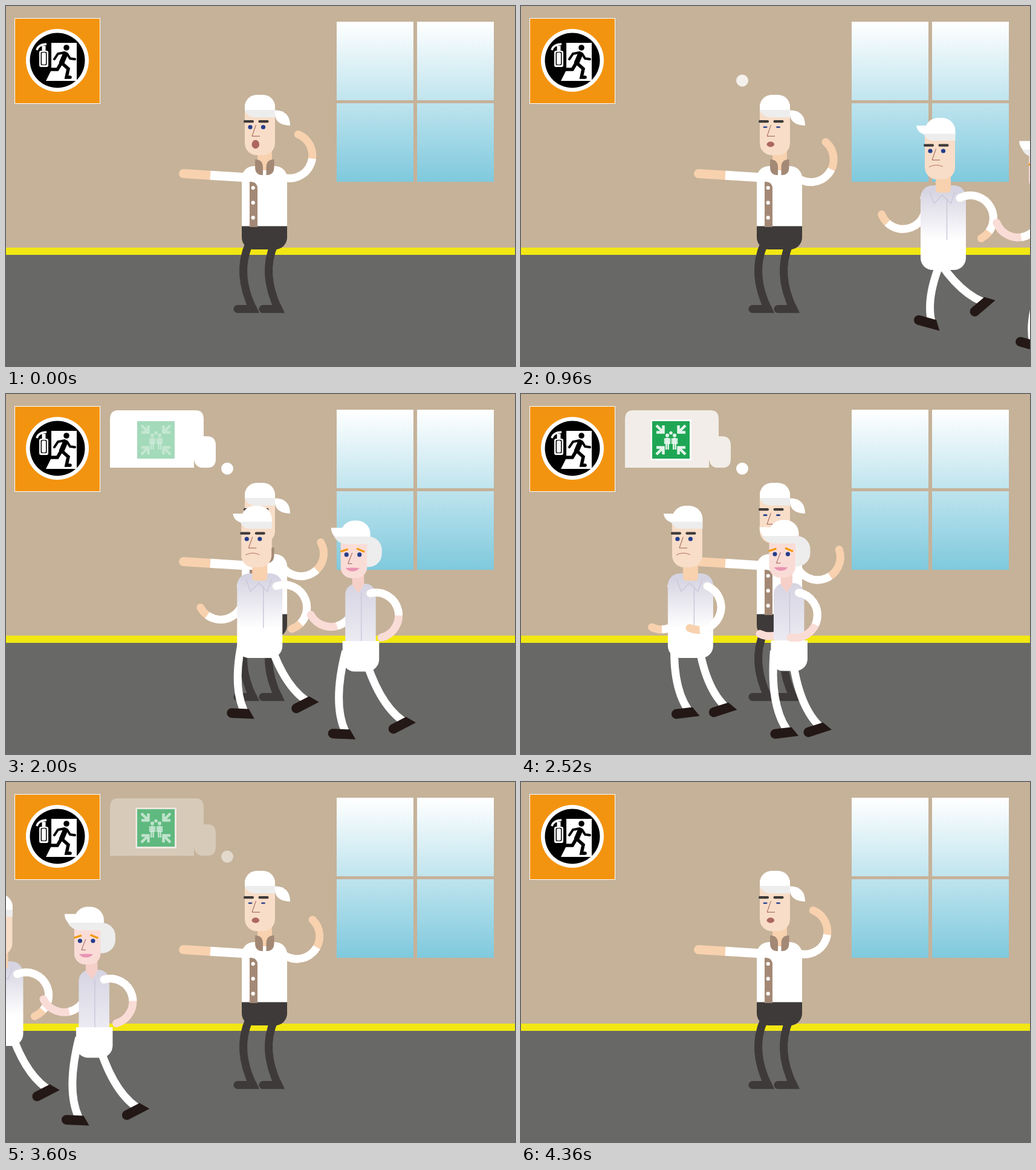
An HTML page with a canvas that plays this animation: 842x596 px, repeating every 4400 ms.

```html
<!DOCTYPE html>
<html>
<head>
<meta charset="utf-8">
<title>Evacuation</title>
<style>
html, body { margin: 0; width: 842px; height: 596px; overflow: hidden }
canvas { display: block }
</style>
</head>
<body>
<canvas id="stage" width="842" height="596"></canvas>
<script>
const c = document.getElementById('stage').getContext('2d');
const LOOP = 4400, STEP = 40, RAD = Math.PI / 180;
const WHITE = '#fff', DARK = '#3e3a39', SKIN = '#f8d1ae', FACE = '#f8ddc8', PINK = '#fadcd7',
  BROWN = '#a38975', GREY = '#ededed', LILAC = '#d6d4e2', SEAM = '#cbc8da', SHOE = '#231815', BLUE = '#243d8c';

// ---- drawing helpers ----
function fill(color, d) { c.fillStyle = color; c.fill(new Path2D(d)); }
function line(color, width, d, cap = 'butt') {
  c.strokeStyle = color; c.lineWidth = width; c.lineCap = cap;
  c.stroke(new Path2D(d));
}
function box(color, x, y, w, h, r = 0) {
  c.fillStyle = color; c.beginPath(); c.roundRect(x, y, w, h, r); c.fill();
}
function oval(color, x, y, rx, ry = rx) {
  c.fillStyle = color; c.beginPath(); c.ellipse(x, y, rx, ry, 0, 0, 7); c.fill();
}
function shade(y0, y1, a, b) {
  const g = c.createLinearGradient(0, y0, 0, y1);
  g.addColorStop(0, a); g.addColorStop(1, b);
  return g;
}
function at(x, y, draw) { c.save(); c.translate(x, y); draw(); c.restore(); }
function turned(x, y, deg, draw) { at(x, y, () => { c.rotate(deg * RAD); draw(); }); }
function faded(alpha, draw) { c.save(); c.globalAlpha = alpha; draw(); c.restore(); }

// ---- motion ----
// Rises from 0 to 1 after start, falls back to 0 at end.
const ramp = (t, start, rise, end, fall) =>
  Math.max(0, Math.min(1, (t - start) / rise, (end - t) / fall));

// Arm swing between -1 and 1, lingering at both ends.
const swing = t => Math.sin(Math.PI / 2 * Math.cos(2 * Math.PI * (t - 935) / 1250));

// Angle of each leg from the lean of the pair, eased between a few key strides.
const LEAN = -12.5;
const STRIDES = [[300, -4], [960, 28], [1440, -4], [2000, -15], [3000, 3], [3600, -15], [4250, 0]];
function stride(t) {
  const i = STRIDES.findIndex(s => s[0] > t);
  if (i < 1) return STRIDES.at(i)[1];
  const [t0, a] = STRIDES[i - 1], [t1, b] = STRIDES[i];
  return a + (b - a) * (1 - Math.cos(Math.PI * (t - t0) / (t1 - t0))) / 2;
}

// ---- room ----
function runSign() {
  box(WHITE, 14, 20, 142, 142);
  box('#f39410', 15, 21, 140, 140);
  oval(WHITE, 85, 90, 52);
  oval('#000', 85, 90, 45.5);
  fill(WHITE, 'M75 61H117V124H66L75 106Z');
  oval('#000', 100, 69, 4.8);
  line('#000', 8.5, 'M98 80L92 94', 'round');
  line('#000', 4, 'M97 77L86 79L80 88M101 79L106 87L114 88', 'round');
  line('#000', 5.5, 'M93 95L103 104L100 118H106M91 95L85 105H71', 'round');
  box(WHITE, 55, 74, 15, 27, 3);
  box('#000', 57.5, 76, 10, 22, 2);
  box(WHITE, 59, 77, 7, 20, 2);
  box(WHITE, 59.5, 66, 6, 9);
  line(WHITE, 3.5, 'M51 73Q53 64 67 63');
}

function room() {
  box('#c5b299', 0, 0, 842, 400);
  box('#f2e713', 0, 400, 842, 12);
  box('#686866', 0, 412, 842, 184);
  const sky = shade(26, 291, WHITE, '#7fc9dd');
  for (const x of [547, 680])
    for (const y of [26, 161]) box(sky, x, y, 127, 130);
  runSign();
}

// ---- thought bubble ----
function meetingSign() {
  box(WHITE, 214.5, 42.5, 67.5, 67.5);
  box('#009a3e', 217, 45, 62, 62);
  at(248, 76, () => {
    for (let k = 0; k < 4; k++) {
      line(WHITE, 4.5, 'M-24 -24L-14 -14M-12.5 -24V-12.5H-24');
      c.rotate(Math.PI / 2);
    }
    oval(WHITE, 0, -11.5, 2.7);
    for (const x of [-6, 6]) {
      oval(WHITE, x, -7.5, 3);
      box(WHITE, x - 3, -3.5, 6, 10, 1.5);
      for (const side of [-1, 1]) {
        line(WHITE, 2, `M${x + 4.2 * side} -2V6`, 'round');
        line(WHITE, 2.5, `M${x + 1.7 * side} 5V16`);
      }
    }
  });
}

function thought(t) {
  faded(ramp(t, 160, 1000, 4100, 1000), () => oval(WHITE, 366, 123.5, 10));
  faded(ramp(t, 960, 1000, 4300, 2300), () => fill(WHITE,
    'M172 122V42Q172 27 185 27H314Q327 27 327 42V70H334Q347 71 347 85V107Q347 122 334 122H323Q312 120 311 107V122Z'));
  faded(ramp(t, 1640, 1000, 4200, 1000), meetingSign);
}

// ---- body parts ----
// Half-circle arm turned around its shoulder; side picks the way it bulges.
function arm(x, y, deg, skin, hand, side = 1) {
  const r = 37.7;
  turned(x, y, deg, () => {
    c.scale(1, side);
    const arc = (color, end, cap) => {
      c.strokeStyle = color; c.lineWidth = 13; c.lineCap = cap;
      c.beginPath(); c.arc(r, 0, r, Math.PI, end); c.stroke();
    };
    arc(skin, 2 * Math.PI, 'round');
    arc(WHITE, 2 * Math.PI - hand, 'butt');
    oval(WHITE, 0, 0, 6.5);
  });
}

// Bowed leg with its shoe, turned as one piece around the hip.
function leg(x, y, deg) {
  turned(x, y, deg, () => {
    line(WHITE, 13, 'M0 0Q-18 87 5 132');
    fill(SHOE, 'M-15 129A8 8 0 0 0 -15 145H23L13 129Z');
  });
}

function legs(t, left, right, y) {
  const d = stride(t);
  leg(left, y, LEAN - d);
  leg(right, y, LEAN + d);
}

// Brows, eyes and nose; origin at the top left of the head.
function face(eye) {
  for (const x of [0, 24.5]) box(DARK, x - 2, 42, 17, 4.2, 2);
  for (const x of [9, 30.5]) oval(BLUE, x, 53.5, 3.6, 3.6 * eye);
  line('#9a5b4d', 1, 'M18.5 50L12 68.5H25');
}

// ---- chef ----
function chef(t) {
  const open = ((1 + Math.cos(2 * Math.PI * t / 377)) / 2) ** 2;
  for (const x of [0, 42]) at(x, 0, () => {
    line(DARK, 13, 'M402 394Q380 443 409 503');
    fill(DARK, 'M383 495H413L419 508.3H383A6.6 6.6 0 0 1 383 495Z');
  });
  line(SKIN, 15, 'M350 281L293.5 277.5', 'round');
  line(WHITE, 15, 'M402 284.2L338 280.2');
  arm(455, 282.5, 58 * ramp(t, 0, 3000, 3960, 960) - 68, SKIN, 1.32, -1);
  box(WHITE, 390, 265, 75, 110, [20, 20, 0, 0]);
  box(DARK, 390, 364.5, 75, 38.5, [0, 0, 20, 20]);
  box(SKIN, 416, 238, 24, 34);
  fill(BROWN, 'M412 254Q425 254 425 267V280Q412 280 412 267ZM443.5 254Q430.5 254 430.5 267V280Q443.5 280 443.5 267Z');
  fill(BROWN, 'M403 291H406Q416 292 416 302V366H403Z');
  for (let k = 0; k < 3; k++) oval(WHITE, 408.7, 301 + 24.7 * k, 3.1);
  at(395, 147, () => {
    box(FACE, 0, 15, 50, 85, [0, 0, 20, 20]);
    box(WHITE, 0, 0, 50, 26, [20, 20, 0, 0]);
    fill(GREY, 'M0 25H50V37.5H17Q3 36 0 25Z');
    fill(WHITE, 'M50 25.5Q75 26 75 51Q52 50 50 34Z');
    face(.36 + .64 * open);
    oval('#ad6663', 17.8, 82, 6.3, 4.4 + 2.8 * open);
  });
}

// ---- walkers ----
function man(t) {
  const w = swing(t);
  at(668 - .268 * (t - 960), 0, () => {
    arm(-1, 318, 122 + 37 * w, SKIN, .45);
    legs(t, 5, 41, 392);
    box(shade(305, 388, LILAC, WHITE), -7, 297, 75, 140, 20);
    line(SEAM, 1.5, 'M8 307L15 327L29 313L43 327L50 307M36.5 318V387');
    box(SKIN, 18, 278, 25, 31, [0, 0, 5, 5]);
    at(0, 186.5, () => {
      box(FACE, 0, 15, 50, 85.5, [0, 0, 20, 20]);
      face(1);
      line('#b0705f', 1, 'M7 80Q18 74 30 79.5');
      box(WHITE, 0, -1.5, 50.5, 28, [22, 22, 0, 0]);
      fill(WHITE, 'M-14 11.5H8V26H-2Q-13 22 -14 11.5Z');
      fill(GREY, 'M-2 25H50.5V36.5H12Q2 35 -2 25Z');
    });
    arm(58, 318, 105 - 43 * w, SKIN, .45);
  });
}

function woman(t) {
  const w = swing(t);
  at(708 - .2755 * (t - 1440), -.00185 * (t - 1440), () => {
    arm(17, 331, 122 + 37 * w, PINK, 1.35);
    legs(t, 8, 37, 427);
    box(shade(315, 411, LILAC, '#ecebf3'), 7.5, 315, 50.5, 100, [18, 18, 0, 0]);
    line(SEAM, 1.5, 'M34 330V411');
    box(WHITE, 3, 410, 60.5, 50.5, [0, 0, 20, 20]);
    fill('#f5cfc8', 'M19 298H38.5V317L29 331L19 317Z');
    box(GREY, 24, 237, 44, 50.5, 22);
    box(PINK, 0, 236, 43.5, 70, [0, 0, 18, 18]);
    line('#f39800', 3, 'M-.5 262L12 258M26.5 257L39.5 262.5');
    for (const x of [9.5, 31]) oval(BLUE, x, 267, 3.6);
    line('#9a5b4d', 1, 'M19 264L12 282H19');
    fill('#e994b3', 'M8 289Q19 288 31 289Q27 294.5 19.5 294.5Q12 294.5 8 289Z');
    box(WHITE, 0, 210.5, 49, 28, [22, 22, 0, 0]);
    fill(WHITE, 'M-16 222.5H8V238H-9Q-16 232 -16 222.5Z');
    fill(GREY, 'M-11 237H49V249.5H8Q-5 248 -11 237Z');
    arm(49, 331, 96 - 25 * w, PINK, 1.32);
  });
}

function frame(now) {
  const t = Math.floor(now % LOOP / STEP) * STEP;
  room();
  thought(t);
  chef(t);
  man(t);
  woman(t);
  requestAnimationFrame(frame);
}
frame(0);
</script>
</body>
</html>
```
